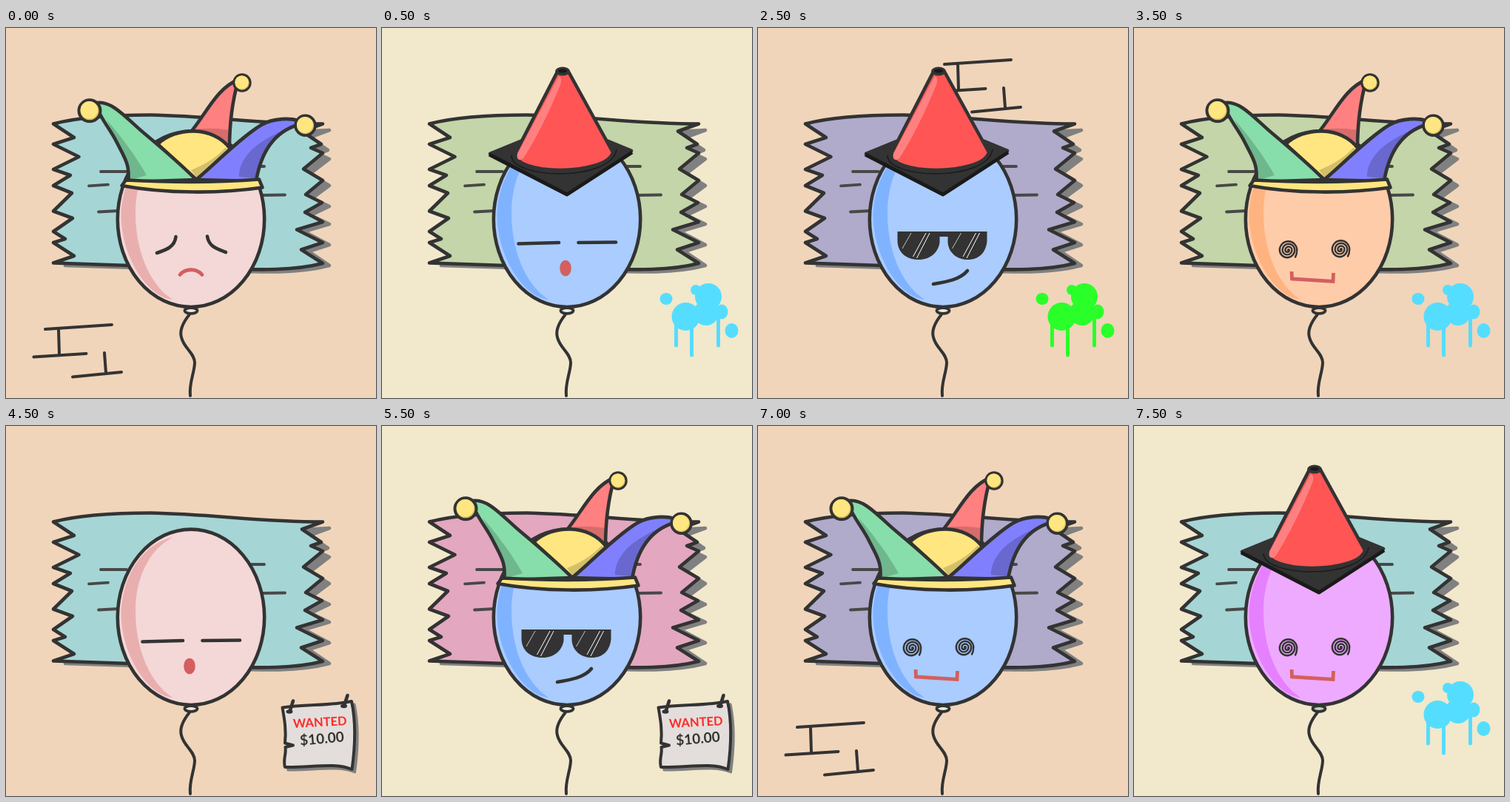
Animation of 500x500 px, one loop 8 s. Source, as an HTML page without scripts:

```html
<!DOCTYPE html>
<html lang="en">
<head>
<meta charset="utf-8">
<title>Balloon moods</title>
<style>
html, body { margin: 0; width: 100%; height: 100%; overflow: hidden; background: #f0d5ba; }
svg { display: block; width: 100vw; height: 100vh; }

/* one look per half second */
.look { visibility: hidden; animation: show 8s step-end infinite; animation-delay: calc(var(--i) * .5s - 8s); }
@keyframes show {
  0% { visibility: visible; }
  6.25%, 100% { visibility: hidden; }
}

.peach { --bg: #f0d5ba; }
.lilac { --bg: #dcb0e8; }
.yellow { --bg: #ffe680; }
.cream { --bg: #f2e8cc; }

.t-teal { --tape: #a6d5d5; }
.t-rose { --tape: #e3a7c0; }
.t-grape { --tape: #b0aacb; }
.t-green { --tape: #c3d5a9; }

.b-pink { --skin: #f4d7d7; --shade: #e9afaf; --knot: #f4e3d7; }
.b-purple { --skin: #eeaaff; --shade: #e580ff; --knot: #c3d0b8; }
.b-blue { --skin: #aaccff; --shade: #80b3ff; --knot: #e3eedd; }
.b-orange { --skin: #ffccaa; --shade: #ffb380; --knot: #ffccaa; }

.ink { stroke: #333; stroke-width: 4.6; stroke-linecap: round; stroke-linejoin: round; }
.line { fill: none; }
.thin { stroke-width: 4; }
.lips { fill: none; stroke: #d35f5f; stroke-width: 4.8; }
.gold { fill: #ffe680; }
text { font-family: Lato, "Open Sans", sans-serif; font-weight: 700; text-anchor: middle; }
</style>
</head>
<body>
<svg viewBox="0 0 500 500">
<defs>
  <g id="base">
    <rect width="500" height="500" fill="var(--bg)"/>
    <path d="M200 150 437 138 410 148 435 165 422 170 437 177 411 197 437 213 414 230 437 241 412 253 437 265 403 275 437 293 409 302 437 321C395 332 345 330 300 328L80 321Z"
      fill="#808080" stroke="#808080" stroke-width="4.6" stroke-linejoin="round"/>
    <path class="ink" fill="var(--tape)" d="M64 129.500C100 120 150 117.500 195 117.500C280 119 340 129.500 428 129.500L400 139.500 426 157 412 162 428 169 402 190.500 428 206 405 225 427 236 404 249 428 262 393 272.500 428 290 399 299.500 428 318C390 328 340 327 300 325.500L64 317.500 92 308 64 290 80 285 64 275 90 257 64 247.500 89 223 64 213 87 199 64 191 98.500 174 64 157 92 148Z"/>
    <path class="ink line" style="stroke:#484848;stroke-width:3.8" d="M128 194H163M112 213.300 138 211.700M125 248.500 152 247M329 187H349M345 226 377 225.500"/>
    <path class="ink line thin" d="M248 387C240 397 234 408 237 418C240 432 255 440 255 452C255 465 247 480 249 497"/>
    <ellipse class="ink" style="stroke-width:3.8" cx="250" cy="382" rx="8.500" ry="3.800" fill="var(--knot)"/>
    <ellipse cx="250" cy="258.300" rx="99" ry="118.700" fill="var(--skin)"/>
    <path fill="var(--shade)" d="M226 150C178 161 155 212 155.500 258C158 312 192 364 225 367C192 345 175 298 175 250C175 205 193 167 226 150Z"/>
    <ellipse class="ink line" cx="250" cy="258.300" rx="99.200" ry="118.700"/>
  </g>

  <g id="sad">
    <path class="ink line" d="M204 304C216 300 228 296 229.500 282M272 281.500C274 295 284 298 297 303"/>
    <path class="lips" stroke-linecap="round" d="M235 333.500C242 325 257 324 265 333.500"/>
  </g>
  <g id="cool">
    <path fill="#333" d="M188.500 275H309.500V288C308 305 297 313 284 313C270 313 258 305 256.500 290V282H245.500V290C243 306 230 313 217 313C200 313 189 303 188.500 288Z"/>
    <g id="glint" fill="none" stroke="#fff">
      <path stroke-width=".7" d="M207 277 195 298"/>
      <path stroke-width="1" d="M227 277 209.500 309M232 277 214.500 311"/>
    </g>
    <use href="#glint" x="67.500"/>
    <path class="ink line" d="M237 346C255 343 273 340 283 328"/>
  </g>
  <path id="curl" class="ink line" style="stroke-width:2.4" d="M0 0A.9 .9 0 0 1 1.800 0A2.700 2.700 0 0 1-3.600 0A4.500 4.500 0 0 1 5.400 0A6.400 6.400 0 0 1-7.400 0A8.300 8.300 0 0 1 9.200 0A10.200 10.200 0 0 1-11.200 0A11.700 11.700 0 0 1 12.200 0Q12.200 6 10 9.500"/>
  <g id="dizzy">
    <use href="#curl" x="208" y="300"/>
    <use href="#curl" x="279" y="299"/>
    <path class="lips" d="M213 329 213.500 339 269 342.500 269.500 331"/>
  </g>
  <g id="sleepy">
    <path class="ink line" d="M184.500 291.500 239 290M265.500 290 316 289.500"/>
    <ellipse cx="248" cy="324.500" rx="7.800" ry="10.800" fill="#d35f5f"/>
  </g>

  <g id="wrap" class="ink">
    <path fill="#e3dedb" d="M155 230C162 185 195 137 250 137C300 137 338 180 348 227.500C290 251.500 215 251 155 230Z"/>
    <path class="line" style="stroke-width:4.2" d="M194 160C230 163 265 160 297 152.500M181 174.500C215 184 245 187 284 186.500M297 153.500C277 169 250 177 222 183M173 185.500C200 203 225 212 255 221M314 168C290 189 260 201 222 209M333 197C300 210 240 228 190 236"/>
  </g>
  <g id="cone">
    <path class="ink" fill="#333" d="M146 170 190 152H303L337 166 250 223Z"/>
    <path fill="none" stroke="#1a1a1a" stroke-width="5" stroke-linejoin="round" d="M145 171 250 225 338 168"/>
    <path fill="none" stroke="#1a1a1a" stroke-width="1.500" d="M175 172C175 205 310 208 317 164"/>
    <path class="ink" fill="#f55" d="M237 59 181 168C174 200 303 200 312 168L252 59Z"/>
    <path fill="#ff8080" d="M239 65Q243 66 242 74C228 110 208 150 191 176C186 181 181 177 183 170Z"/>
    <ellipse cx="244" cy="58.500" rx="10" ry="6" fill="#333"/>
    <ellipse cx="244" cy="58" rx="6" ry="2.500" fill="#1a1a1a"/>
  </g>
  <g id="bell">
    <circle class="ink" fill="#d9c162" style="stroke-width:4" r="14.500"/>
    <circle class="gold" cx="-.6" cy="-1" r="11.800"/>
  </g>
  <path id="green-horn" d="M123 101C145 98 165 125 190 145C215 166 240 188 257 205L165 208C168 185 160 175 150 155C143 140 130 125 125 112Z"/>
  <path id="blue-horn" d="M257 205C280 186 318 147 345 131C362 121 385 122 394 125V131C365 140 345 165 338 207Z"/>
  <g id="jester">
    <path fill="#ff8080" d="M251 139C270 116 286 80 314 70C306 98 302 130 302 162Z"/>
    <path fill="#d86c6c" d="M256 137Q278 134 302 138V162Q280 142 256 139Z"/>
    <path class="ink line" d="M251 139C270 116 286 80 314 70C306 98 302 130 302 162"/>
    <path class="ink gold" d="M205 157C230 133 280 132 303 163L258 206Z"/>
    <path fill="#d4bf6a" d="M250 192Q280 180 296 162L301 164 258 203Z"/>
    <use href="#green-horn" fill="#87deaa"/>
    <path fill="#6fb78d" d="M136 124C150 140 174 170 190 199L166 206C168 185 160 175 150 155Z"/>
    <use href="#green-horn" class="ink line"/>
    <use href="#blue-horn" fill="#8080ff"/>
    <path fill="#6868cf" d="M392 130C365 140 345 165 338 203L315 201C314 185 327 166 344 155C358 145 376 138 392 130Z"/>
    <use href="#blue-horn" class="ink line"/>
    <path class="ink gold" d="M162 205.500C220 208.500 290 208.500 342 204.500L346.500 215.500C290 224 215 224 156.500 213Z"/>
    <use href="#bell" x="113" y="111.800"/>
    <use href="#bell" transform="translate(319 74) scale(.77)"/>
    <use href="#bell" transform="translate(404.500 131.700) scale(.92)"/>
  </g>
  <g id="plaster" transform="translate(278 223)">
    <rect x="-20" y="-6.500" width="40" height="13" rx="5" fill="#dba87f" transform="rotate(-32)"/>
    <g transform="rotate(18)">
      <rect x="-20" y="-6.500" width="40" height="13" rx="5" fill="#e0ac88"/>
      <rect x="-7.500" y="-3.500" width="15" height="7" rx="3" fill="#ffd0a6"/>
    </g>
  </g>

  <path id="bricks" class="ink line thin" d="M53 407 143 401M71 407 72 441M37.500 444.500 108.500 440M133 439 135 466M90 471.500 156 465"/>
  <path id="paper" d="M373.500 380.500C405 376 440 378 467 372C473 400 472 432 467.500 464C445 454 410 462 377 461C374 450 379 444 377.500 434L388 431.500 377 428.500C379 410 376 395 373.500 380.500Z"/>
  <g id="pin">
    <path class="ink line" d="M388 371.500 384 384"/>
    <ellipse cx="383" cy="386" rx="4.500" ry="2.700" fill="#333"/>
  </g>
  <g id="sign">
    <use href="#paper" x="4" y="4" fill="#808080" stroke="#808080" stroke-width="3" stroke-linejoin="round"/>
    <use href="#paper" class="ink thin" fill="#e3dedb"/>
    <use href="#pin"/>
    <use href="#pin" x="73.500" y="-7.500"/>
    <text transform="translate(424.500 406) rotate(-3)" font-size="16.500" fill="var(--word, #ff2a2a)">WANTED</text>
    <text transform="translate(427.500 429) rotate(-5)" font-size="19" fill="#333">$10.00</text>
  </g>
  <g id="splat" fill="var(--paint, #5df)">
    <circle cx="441" cy="363" r="18"/>
    <circle cx="410.500" cy="390" r="19"/>
    <circle cx="438" cy="385" r="17"/>
    <circle cx="424" cy="354" r="7"/>
    <ellipse cx="459" cy="383.500" rx="8.500" ry="10"/>
    <ellipse cx="384" cy="366" rx="8.500" ry="8"/>
    <ellipse cx="472.500" cy="409" rx="9" ry="10"/>
    <path stroke="var(--paint, #5df)" stroke-width="5" stroke-linecap="round" d="M397.500 395V429M418.500 400V442M454.500 390V429"/>
  </g>
</defs>

<g class="look peach t-teal b-pink" style="--i:0"><use href="#base"/><use href="#bricks"/><use href="#sad"/><use href="#jester"/></g>
<g class="look cream t-green b-blue" style="--i:1"><use href="#base"/><use href="#splat"/><use href="#sleepy"/><use href="#cone"/></g>
<g class="look lilac t-teal b-blue" style="--i:2;--word:#2a7fff"><use href="#base"/><use href="#sign"/><use href="#dizzy"/><use href="#plaster"/></g>
<g class="look lilac t-rose b-purple" style="--i:3"><use href="#base"/><use href="#sign"/><use href="#cool"/><use href="#wrap"/></g>
<g class="look peach t-green b-purple" style="--i:4"><use href="#base"/><use href="#sad"/><use href="#jester"/></g>
<g class="look peach t-grape b-blue" style="--i:5;--paint:#2aff2a"><use href="#base"/><use href="#bricks" x="199" y="-358"/><use href="#splat"/><use href="#cool"/><use href="#cone"/></g>
<g class="look yellow t-rose b-orange" style="--i:6"><use href="#base"/><use href="#sign"/><use href="#sleepy"/><use href="#wrap"/></g>
<g class="look peach t-green b-orange" style="--i:7"><use href="#base"/><use href="#splat"/><use href="#dizzy"/><use href="#jester"/></g>
<g class="look peach t-teal b-blue" style="--i:8"><use href="#base"/><use href="#splat"/><use href="#cool"/><use href="#plaster"/></g>
<g class="look peach t-teal b-pink" style="--i:9"><use href="#base"/><use href="#sign"/><use href="#sleepy"/></g>
<g class="look lilac t-grape b-orange" style="--i:10"><use href="#base"/><use href="#bricks"/><use href="#sad"/><use href="#cone"/></g>
<g class="look cream t-rose b-blue" style="--i:11"><use href="#base"/><use href="#sign"/><use href="#cool"/><use href="#jester"/></g>
<g class="look yellow t-green b-pink" style="--i:12"><use href="#base"/><use href="#sign"/><use href="#sleepy"/><use href="#plaster"/></g>
<g class="look lilac t-teal b-orange" style="--i:13"><use href="#base"/><use href="#splat"/><use href="#sad"/><use href="#wrap"/></g>
<g class="look peach t-grape b-blue" style="--i:14"><use href="#base"/><use href="#bricks"/><use href="#dizzy"/><use href="#jester"/></g>
<g class="look cream t-teal b-purple" style="--i:15"><use href="#base"/><use href="#splat"/><use href="#dizzy"/><use href="#cone"/></g>
</svg>
</body>
</html>
```
